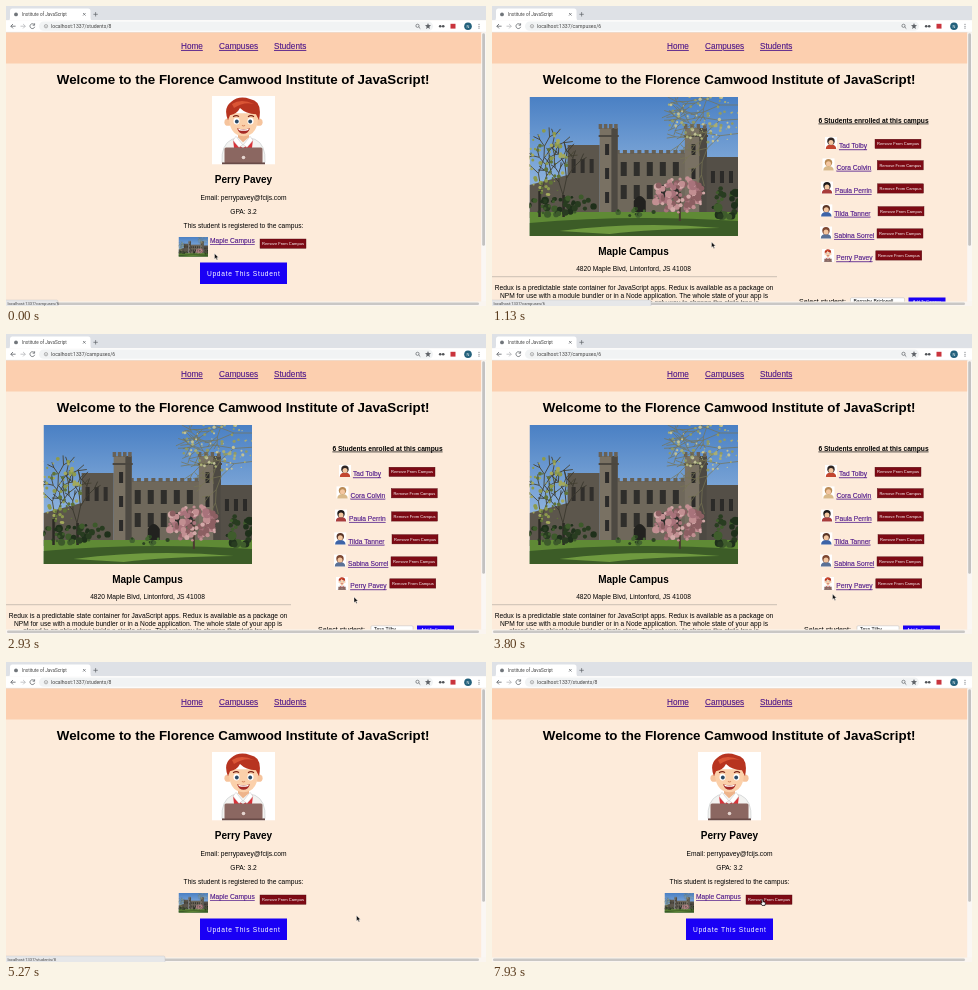
Write an HTML page that moves like this. It is 480 px wide and 300 px high and loops after 8 s.

```html
<!DOCTYPE html>
<html lang="en">
<head>
<meta charset="utf-8">
<title>Institute of JavaScript</title>
<style>
  html, body { margin: 0; width: 100%; height: 100%; overflow: hidden; background: #fdebda; }
  svg { display: block; width: 100%; height: 100%; }
  text { font-family: "Liberation Sans", Arial, sans-serif; font-size: 6.67px; fill: #000; }
  .ui { font-family: Roboto, "Liberation Sans", sans-serif; fill: #444; }
  .bold { font-weight: bold; }
  .mid { text-anchor: middle; }
  .light { fill: #fff; }
  .link { fill: #4f188a; stroke: #4f188a; stroke-width: .12; text-decoration: underline; }
  .link.active { fill: #ee1010; stroke: #ee1010; }
</style>
</head>
<body>
<svg viewBox="0 0 480 300" preserveAspectRatio="none">
  <defs>
    <linearGradient id="sky" x2="0" y2="1">
      <stop offset="0" stop-color="#4a80c4"/><stop offset="1" stop-color="#b4d0ec"/>
    </linearGradient>
    <symbol id="photo" viewBox="0 0 208 139" preserveAspectRatio="none"></symbol>
    <symbol id="boy" viewBox="0 0 63 68" preserveAspectRatio="none">
      <rect width="63" height="68" fill="#fff"/>
      <path d="M10 66Q9 48 20 43L31 40L43 43Q54 48 53 66Z" fill="#f3f3f1" stroke="#c5c8ca" stroke-width=".6"/>
      <path d="M21 43L31 52L41 43L39 60H23Z" fill="#d8343a"/>
      <path d="M24 40L31 49L38 40L41 44L35 51L31 48L27 51L21 44Z" fill="#fff" stroke="#c9c9c9" stroke-width=".5"/>
      <path d="M26 34H37V41L31 46L26 41Z" fill="#eeb48b"/>
      <circle cx="16" cy="26" r="3.6" fill="#f6c49d"/><circle cx="47" cy="26" r="3.6" fill="#f6c49d"/>
      <path d="M17 17Q16 39 31.5 40Q47 39 46 17Z" fill="#fbd0aa"/>
      <path d="M16 24Q11 12 19 6Q27 -1 38 3Q51 5 47 24L44 18Q34 18 28 12Q25 18 18 19Z" fill="#b73420"/>
      <path d="M20 8Q29 2 42 8Q32 5 22 12Z" fill="#da5535"/>
      <path d="M21 20.5q3.5 -2 6 0M36 20.5q3 -2 6 0" fill="none" stroke="#7a2416" stroke-width="1.2"/>
      <g fill="#fff"><ellipse cx="24.5" cy="25" rx="3" ry="3.3"/><ellipse cx="38.5" cy="25" rx="3" ry="3.3"/></g>
      <g fill="#2b4a66"><circle cx="24.8" cy="25.3" r="1.9"/><circle cx="38.2" cy="25.3" r="1.9"/></g>
      <path d="M30 29q1.5 1.5 3 0" fill="none" stroke="#d98d66"/>
      <path d="M25 32Q31.5 34 38 32Q36 37.5 31.5 37.5Q27 37.5 25 32Z" fill="#a52a26"/>
      <path d="M26 32.5Q31.5 34 37 32.5L36 34Q31.5 35 27 34Z" fill="#fff"/>
      <rect x="12.500" y="51" width="38" height="16" rx="1.5" fill="#8b6761"/>
      <rect x="10" y="66" width="43" height="2" fill="#684b47"/>
      <circle cx="31.500" cy="61" r="1.8" fill="#e4d4cf"/>
    </symbol>
  </defs>
  <rect width="480" height="300" fill="#fdebda"/>
  <rect y="26" width="476" height="31.500" fill="#fccfaf"/>
  <g id="common"></g>
  <g id="student"></g>
  <g id="campus"></g>
  <g id="chrome"></g>
  <g id="status">
    <rect id="bubble" x="-2" y="294" height="8" rx="1.5" fill="#e6e7e9" stroke="#bfc1c4" stroke-width=".4"/>
    <text id="statusText" class="ui" x="1.500" y="298.600" style="font-size:4.1px"></text>
  </g>
  <path id="arrow" d="M0 0V5.600L1.400 4.400L2.300 6.400L3.200 6L2.300 4.100H4Z" fill="#111" stroke="#fff" stroke-width=".4"/>
  <path id="hand" d="M-.6 .2Q0 -.5 .6 .2V2.200L2.500 2.700Q3.100 3 2.900 3.800L2.500 5.900H-.5L-1.900 3.800Q-1.900 3 -.6 3.700Z" fill="#fff" stroke="#111" stroke-width=".8"/>
</svg>
<script>
const LOOP = 8000;
const $ = id => document.getElementById(id);

const text = (x, y, str, cls = '', size = 6.67, extra = '') =>
  `<text x="${x}" y="${y}" class="${cls}" style="font-size:${size}px" ${extra}>${str}</text>`;
const rect = (x, y, w, h, fill, extra = '') =>
  `<rect x="${x}" y="${y}" width="${w}" height="${h}" fill="${fill}" ${extra}/>`;
const dot = (x, y, r, fill) => `<circle cx="${x}" cy="${y}" r="${r}" fill="${fill}"/>`;
const shape = (d, fill) => `<path d="${d}" fill="${fill}"/>`;
const line = (d, color = '#5f6368', width = .8) =>
  `<path d="${d}" fill="none" stroke="${color}" stroke-width="${width}"/>`;
const removeButton = (x, y) =>
  rect(x, y, 46, 9.3, '#7d0a14', 'stroke="#4d0910" stroke-width=".4"') +
  text(x + 23, y + 6.1, 'Remove From Campus', 'mid light', 4.05);

function seeded(seed) {
  return () => (seed = (seed * 16807) % 2147483647) / 2147483647;
}

function foliage(rnd, n, cx, cy, rx, ry, size, colors) {
  let out = '';
  for (let i = 0; i < n; i++) {
    const a = rnd() * 6.283, d = Math.sqrt(rnd());
    out += dot((cx + Math.cos(a) * d * rx).toFixed(1), (cy + Math.sin(a) * d * ry).toFixed(1),
      (size * (.5 + rnd())).toFixed(1), colors[i % colors.length]);
  }
  return out;
}

// Path data of a branch that forks `depth` times.
function branch(rnd, x, y, angle, len, depth) {
  const x2 = x + Math.cos(angle) * len, y2 = y + Math.sin(angle) * len;
  let d = `M${x.toFixed(1)} ${y.toFixed(1)}L${x2.toFixed(1)} ${y2.toFixed(1)}`;
  if (depth) for (const side of [-.45, .4])
    d += branch(rnd, x2, y2, angle + side * (.5 + rnd()), len * (.65 + rnd() * .25), depth - 1);
  return d;
}

function tower(x, y, w, h) {
  let out = rect(x, y, w, h, '#797163') + rect(x + w * .65, y, w * .35, h, '#4d4942') +
    rect(x - 1, y + 7, w + 2, 2, '#4b4740');
  for (let i = 0; i < 4; i++) out += rect(x - 1 + i * (w - 1) / 3.3, y - 4, 3.5, 5, '#686156');
  for (let i = 0; i < 3; i++) out += rect(x + w * .3, y + 16 + i * 24, 4, 11, '#2b2a29');
  return out;
}

function campusPhoto() {
  const rnd = seeded(41);
  let out = rect(0, 0, 208, 139, 'url(#sky)') +
    shape('M0 88L38 78V48H70V121H0Z', '#5c564c') +
    rect(86, 56, 72, 65, '#6f685b') + rect(176, 60, 32, 60, '#544f47');
  for (let i = 0; i < 10; i++) out += rect(86 + i * 7.2, 53, 4, 4, '#655f54');
  for (let row = 0; row < 2; row++)
    for (let i = 0; i < 5; i++) out += rect(91 + i * 13, 65 + row * 23, 6, 14, '#2f2e2b');
  for (let i = 0; i < 3; i++) out += rect(181 + i * 9, 74, 4, 12, '#2b2a28') + rect(42 + i * 9, 62, 4, 14, '#302e2b');
  out += shape('M104 120V104Q110 94 116 104V120Z', '#22221f') +
    tower(70, 31, 18, 89) + tower(155, 31, 22, 92) +
    rect(0, 115, 208, 24, '#5f8a35') +
    shape('M0 126Q100 117 208 124V139H0Z', '#3c5c27') +
    shape('M30 134Q110 124 190 131Q120 132 80 137Z', '#6f9a3f') +
    line(branch(rnd, 10, 118, -1.5, 24, 5), '#474334', .9) +
    line(branch(rnd, 34, 118, -1.6, 20, 4), '#3a382e', .9) +
    line('M10 120V94M34 120V98', '#2c2b25', 2.5) +
    foliage(rnd, 70, 18, 64, 20, 34, 1.4, ['#8d9a4c', '#5f7338', '#a3a95c']) +
    foliage(rnd, 45, 30, 108, 36, 10, 2.6, ['#283c20', '#3d5a2b', '#1f301b']) +
    foliage(rnd, 28, 196, 106, 14, 16, 3, ['#283c20', '#3f5c2c', '#1f301b']) +
    foliage(rnd, 14, 106, 115, 22, 4, 2, ['#2d4523', '#436430']);
  for (let i = 0; i < 4; i++)
    out += line(branch(rnd, 212, -6 + i * 14, 3.2 - i * .06, 22, 4), '#777553', .7);
  return out +
    foliage(rnd, 110, 178, 20, 44, 28, 1.1, ['#a9ae75', '#8f9a68', '#c1c196']) +
    line('M150 124V95', '#4b3a31', 2) +
    foliage(rnd, 110, 149, 98, 25, 18, 2.4, ['#c28f92', '#a8737b', '#d3a9a8', '#8c5f62']);
}

function avatar(x, y, hair, shirt) {
  return rect(x, y, 12, 12, '#fff') +
    shape(`M${x + .8} ${y + 12}q0 -4.500 5.200 -4.500t5.200 4.500Z`, shirt) +
    dot(x + 6, y + 4.2, 3.7, hair) + dot(x + 6, y + 5.4, 2.5, '#f3c6a0');
}

const common =
  text(175, 43, 'Home', 'link', 8.2) + text(213, 43, 'Campuses', 'link', 8.2) +
  text(268, 43, 'Students', 'link', 8.2) +
  text(237.2, 78.4, 'Welcome to the Florence Camwood Institute of JavaScript!', 'bold mid', 13.35);

const student =
  '<use href="#boy" x="206" y="90" width="63" height="68.500"/>' +
  text(237.5, 177.4, 'Perry Pavey', 'bold mid', 10) +
  text(237.5, 193.8, 'Email: perrypavey@fcijs.com', 'mid') +
  text(237.5, 208, 'GPA: 3.2', 'mid') +
  text(237.5, 222.4, 'This student is registered to the campus:', 'mid') +
  '<use href="#photo" x="172.500" y="231" width="29.500" height="19.700"/>' +
  text(204, 237.2, 'Maple Campus', 'link', 6.67, 'id="campusLink"') +
  removeButton(254, 233) +
  rect(194, 256.5, 87, 21.5, '#1a00f5') +
  text(201, 269.6, 'Update This Student', 'light', 6.67, 'letter-spacing=".68"');

// name, name x, button x, row offset, hair, shirt
const roster = [
  ['Tad Tolby', 347, 383, 0, '#2e2422', '#c2452f'],
  ['Cora Colvin', 344.5, 385.3, 21.4, '#b98a55', '#d9b98a'],
  ['Paula Perrin', 343, 385.5, 44.6, '#1d1818', '#a83c3c'],
  ['Tilda Tanner', 342.3, 386, 67.4, '#5a3527', '#3d64a8'],
  ['Sabina Sorrel', 342, 385, 89.6, '#7d4630', '#5a7196'],
];
const rosterRows = roster.map(([name, nameX, buttonX, dy, hair, shirt]) =>
  avatar(nameX - 14, 131 + dy, hair, shirt) + text(nameX, 142.4 + dy, name, 'link') +
  removeButton(buttonX, 133.2 + dy)).join('');

const campus =
  '<use href="#photo" x="37.500" y="91" width="208.500" height="139"/>' +
  text(141.5, 248.6, 'Maple Campus', 'bold mid', 10) +
  text(141.5, 265, '4820 Maple Blvd, Lintonford, JS 41008', 'mid') +
  line('M0 270.700H285', '#aaa19a', .6) +
  text(142, 284, 'Redux is a predictable state container for JavaScript apps. Redux is available as a package on', 'mid') +
  text(142, 291.5, 'NPM for use with a module bundler or in a Node application. The whole state of your app is', 'mid') +
  text(142, 299.4, 'stored in an object tree inside a single store. The only way to change the state tree is', 'mid') +
  text(381.5, 116.6, '6 Students enrolled at this campus', 'bold mid', 6.67, 'text-decoration="underline"') +
  rosterRows +
  '<use href="#boy" x="330" y="243" width="12" height="13"/>' +
  text(344.3, 254.4, 'Perry Pavey', 'link', 6.67, 'id="studentLink"') +
  removeButton(383.8, 244.8) +
  '<g id="picker"></g>';

function picker(wide) {
  const x = wide ? 307 : 312, boxX = wide ? 358.5 : 365, boxW = wide ? 54 : 42;
  const buttonX = boxX + boxW + 4;
  return text(x, 297.6, 'Select student:', '', 7.1) +
    rect(boxX, 291.8, boxW, 7, '#fff', 'rx="1" stroke="#aaa" stroke-width=".4"') +
    text(boxX + 3, 297, wide ? 'Barnaby Brickwell' : 'Tess Tilby', '', 5) +
    rect(buttonX, 291.5, 37, 9, '#1a00f5') +
    text(buttonX + 18.5, 297, 'Add To Campus', 'mid light', 4);
}

const chrome =
  rect(0, 0, 480, 14.5, '#dee1e6') +
  shape('M2 14.500Q4 14.500 4 12V5Q4 2.500 6.500 2.500H82Q84.500 2.500 84.500 5V12Q84.500 14.500 86.500 14.500Z', '#fff') +
  dot(10, 8.4, 1.9, '#70757a') + text(16, 10, 'Institute of JavaScript', 'ui', 4.6) +
  line('M77 7L79.600 9.600M79.600 7L77 9.600M87.400 8.300H91.800M89.600 6.100V10.500', '#5f6368', .7) +
  rect(0, 14.2, 480, 12, '#fff') + rect(0, 25.9, 480, .4, '#d5d6d8') +
  rect(33, 15.6, 394, 9.2, '#f1f3f4', 'rx="4.600"') +
  line('M9.600 20.200H4.800M7 18L4.800 20.200L7 22.400') +
  line('M14.500 20.200H19.300M17.100 18L19.300 20.200L17.100 22.400', '#b5b7ba') +
  line('M28.300 18.700A2.400 2.400 0 1 0 28.700 20.800M28.600 17.300V19.200H26.700') +
  '<circle cx="40" cy="20.200" r="1.700" fill="none" stroke="#777" stroke-width=".5"/>' +
  line('M40 20V21.200M40 19.100V19.500', '#777', .5) +
  text(45, 22, '', 'ui', 5.1, 'id="url"') +
  '<circle cx="411.500" cy="19.800" r="1.600" fill="none" stroke="#5f6368" stroke-width=".7"/>' +
  line('M412.700 21L414.300 22.600') +
  shape('M422 17L422.800 19.100L425 19.300L423.300 20.800L423.900 23L422 21.800L420.100 23L420.700 20.800L419 19.300L421.200 19.100Z', '#5f6368') +
  dot(434.2, 20.2, 1.3, '#505357') + dot(437.2, 20.2, 1.3, '#505357') +
  rect(444.5, 17.8, 5, 4.8, '#c9343d') +
  dot(462, 20.2, 3.8, '#23617c') + text(462, 21.6, 'N', 'mid light', 4) +
  [18.3, 20.2, 22.1].map(y => dot(473, y, .55, '#5f6368')).join('') +
  rect(475.2, 26.3, 4.8, 273.7, '#faf7f4') + rect(0, 295.5, 480, 4.5, '#faf5f0') +
  rect(476.2, 27.3, 2.8, 212.5, '#c3c2c1', 'rx="1.400"') +
  rect(1, 296.5, 472, 2.5, '#c9c7c5', 'rx="1.200"');

$('photo').innerHTML = campusPhoto();
Object.entries({ common, student, campus, chrome }).forEach(([id, html]) => { $(id).innerHTML = html; });

// time, x, y of the pointer tip
const path = [
  [0, 208.5, 247.5], [730, 219.5, 236], [2330, 219.5, 236], [2670, 348, 263],
  [2930, 348, 263], [3270, 367, 262], [3730, 340.5, 260], [3800, 340.5, 260],
  [4330, 350.5, 253.5], [6130, 350.5, 253.5], [6470, 317.5, 249.5],
  [6870, 317.5, 249.5], [7670, 273, 235], [7730, 273, 235], [7930, 270.5, 237.5],
];
const clamp = v => Math.max(0, Math.min(1, v));
const ramp = (t, from, to) => clamp((t - from) / (to - from));
const within = (t, from, to) => t >= from && t < to;

function pointer(t) {
  let i = 0;
  while (i < path.length - 2 && t >= path[i + 1][0]) i++;
  const [t0, x0, y0] = path[i], [t1, x1, y1] = path[i + 1];
  const p = ramp(t, t0, t1), e = p * p * (3 - 2 * p);
  return [x0 + (x1 - x0) * e, y0 + (y1 - y0) * e];
}

let wasWide = null;

function render(t) {
  const onCampus = within(t, 1130, 5270);
  $('student').style.display = onCampus ? 'none' : '';
  $('campus').style.display = onCampus ? '' : 'none';
  $('url').textContent = 'localhost:1337/' + (onCampus ? 'campuses/6' : 'students/8');
  $('campusLink').classList.toggle('active', within(t, 930, 1130));
  $('studentLink').classList.toggle('active', within(t, 5000, 5270));

  const wide = t < 1200;
  if (wide !== wasWide) $('picker').innerHTML = picker(wasWide = wide);

  // The bubble widens once its link has been followed.
  const first = t < 3000;
  const followed = first ? onCampus : !onCampus;
  $('statusText').textContent = 'localhost:1337/' + (first ? 'campuses/6' : 'students/8');
  $('bubble').setAttribute('width', followed ? 161 : 54);
  $('status').setAttribute('opacity', first
    ? 1 - ramp(t, 1400, 1800)
    : ramp(t, 4400, 4670) * (1 - ramp(t, 5500, 5800)));

  const [x, y] = pointer(t);
  const isHand = within(t, 500, 1130) || within(t, 4400, 5270) || (t > 7000 && x < 300 && y < 242);
  for (const id of ['arrow', 'hand']) {
    $(id).setAttribute('transform', `translate(${x.toFixed(2)} ${y.toFixed(2)})`);
    $(id).style.display = (id === 'hand') === isHand ? '' : 'none';
  }
}

const start = performance.now();
function tick(now) {
  render(Math.max(0, now - start) % LOOP);
  requestAnimationFrame(tick);
}
render(0);
requestAnimationFrame(tick);
</script>
</body>
</html>
```
